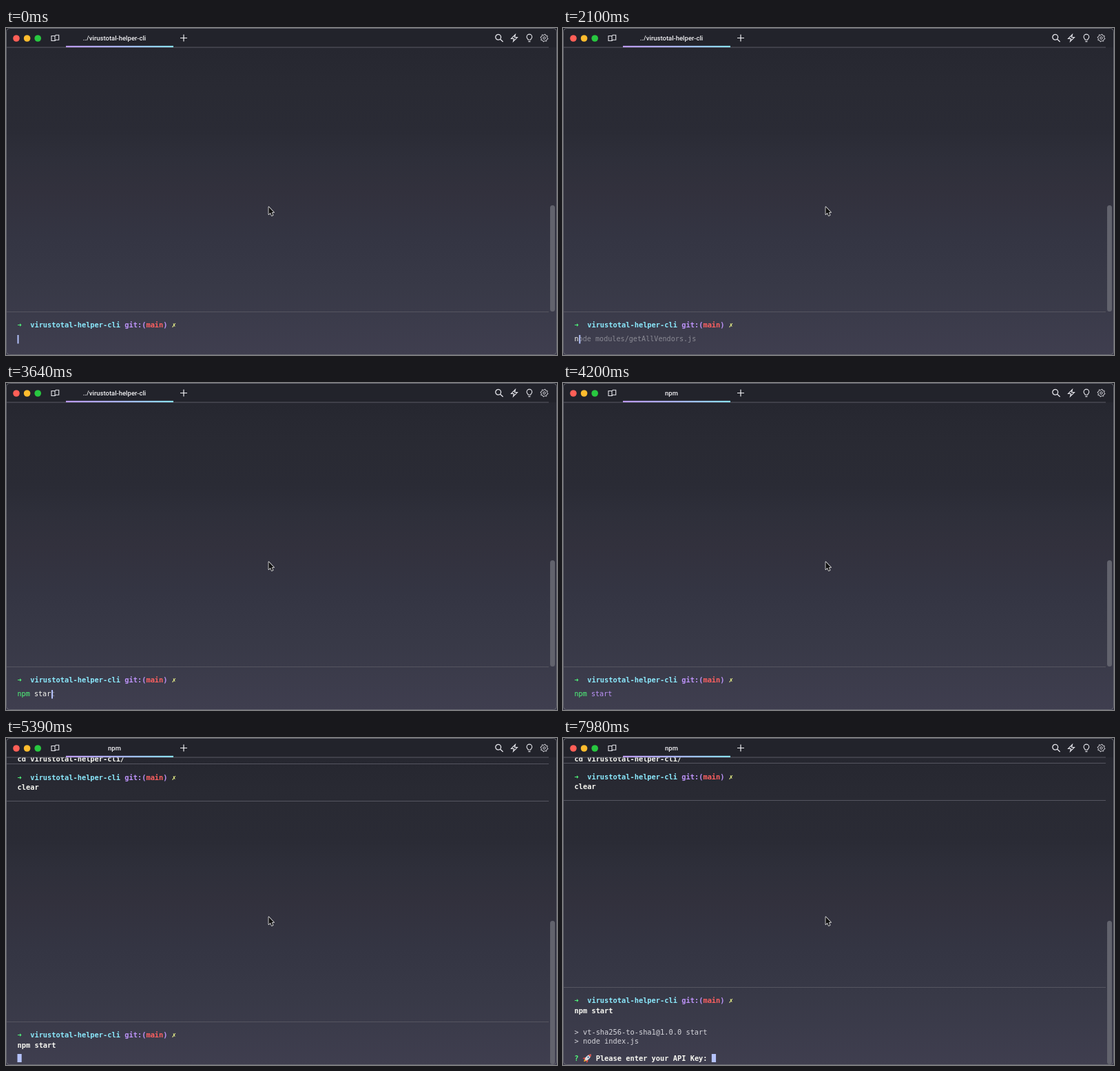
Animation of 800 by 474 pixels, one loop 8 s. Source, as an HTML page with a canvas:

```html
<!DOCTYPE html>
<html lang="en">
<head>
<meta charset="utf-8">
<title>Terminal session</title>
<style>
  html, body { margin: 0; width: 100%; height: 100%; overflow: hidden; background: #21222a; }
  canvas { display: block; width: 800px; height: 474px; }
</style>
</head>
<body>
<canvas id="stage"></canvas>
<script>
const W = 800, H = 474, LOOP = 8000;
const canvas = document.getElementById('stage');
const ctx = canvas.getContext('2d');
const ratio = window.devicePixelRatio || 1;
canvas.width = W * ratio;
canvas.height = H * ratio;

const C = {
  white: '#f8f8f2', soft: '#d6d6dc', ghost: '#8a8a94', green: '#50fa7b', cyan: '#8be9fd',
  purple: '#bd93f9', red: '#ff6060', yellow: '#f1fa8c', caret: '#b4c2fb', rule: '#555560'
};
const MONO = '"DejaVu Sans Mono", monospace';
const LEFT = 16.5, CELL = 6.23, INPUT_CELL = 6.1;
const OUTPUT = '10.35px ' + MONO, BOLD = 'bold ' + OUTPUT, INPUT = '10.13px ' + MONO;
const PROJECT = 'virustotal-helper-cli';

const COMMAND = 'npm start';
const KEYS = [2100, 2310, 2520, 2730, 3150, 3290, 3430, 3570, 3710];
const T = { npmValid: 2730, argValid: 3990, enter: 4200, block: 5180, output: 6650, question: 7980 };
const BLINK = 525;

function gradient(x0, y0, x1, y1, stops) {
  const g = ctx.createLinearGradient(x0, y0, x1, y1);
  stops.forEach(([at, color]) => g.addColorStop(at, color));
  return g;
}

function rect(x, y, w, h, color) {
  ctx.fillStyle = color;
  ctx.fillRect(x, y, w, h);
}

function disc(x, y, r, color) {
  ctx.fillStyle = color;
  ctx.beginPath();
  ctx.arc(x, y, r, 0, Math.PI * 2);
  ctx.fill();
}

function pill(x, y, w, h, color) {
  ctx.fillStyle = color;
  ctx.beginPath();
  ctx.roundRect(x, y, w, h, w / 2);
  ctx.fill();
}

function text(str, x, y, font, color, align = 'left') {
  ctx.font = font;
  ctx.textAlign = align;
  ctx.fillStyle = color;
  ctx.fillText(str, x, y);
}

function outline(path, color = '#e6e6ec', width = 1.1) {
  ctx.strokeStyle = color;
  ctx.lineWidth = width;
  ctx.stroke(new Path2D(path));
}

function rule(y) {
  rect(1, y, 787, 1, C.rule);
}

function background() {
  rect(0, 0, W, H, gradient(0, 28, 0, H, [
    [0, '#262730'], [0.13, '#292a33'], [0.27, '#2a2b35'], [0.36, '#2e2f3a'],
    [0.47, '#32313d'], [0.62, '#343543'], [0.78, '#383947'], [1, '#3f3e4f']
  ]));
}

function gear(x, y) {
  let path = '';
  for (let i = 0; i < 32; i++) {
    const a = (i + 0.5) * Math.PI / 16;
    const r = i % 4 < 2 ? 5.4 : 4.2;
    path += (i ? 'L' : 'M') + (x + r * Math.cos(a)) + ' ' + (y + r * Math.sin(a));
  }
  outline(path + 'Z', '#e6e6ec', 1);
  outline(`M${x + 1.7} ${y}a1.7 1.7 0 1 1 -3.4 0a1.7 1.7 0 1 1 3.4 0`, '#e6e6ec', 1);
}

function titleBar(title) {
  rect(0, 0, W, 28, '#22232b');
  rect(1, 27.5, 787, 1, '#5a5b64');
  ['#ff5f57', '#febc2e', '#28c840'].forEach((color, i) => disc(15 + i * 15.6, 15, 4.8, color));
  outline('M66 11.5h5v7h-5zM71 11.5l1.5-1.3h4.2v7h-4.2L71 18.5');
  text(title, 157.5, 17.8, '500 9.5px Roboto, sans-serif', '#f2f2f5', 'center');
  rect(87, 25.8, 156, 2.2, gradient(87, 0, 243, 0, [[0, '#bd9bf5'], [0.5, '#aab4f8'], [1, '#8be4fd']]));
  outline('M253 14.5h10M258 9.5v10', '#f0f0f4', 1.2);
  outline('M718.6 13.3a3.9 3.9 0 1 1 -7.8 0a3.9 3.9 0 1 1 7.8 0M717.6 16.2L721.6 20', '#e6e6ec', 1.3);
  outline('M739.5 9.5L733.5 15.5H737.5L736.5 19.5L742.5 13.5H738.5Z');
  outline('M758.2 17.3C758 15.8 756.1 15.2 756.1 12.9A3.8 3.8 0 0 1 763.7 12.9C763.7 15.2 761.8 15.8 761.6 17.3ZM758.4 19.6H761.4');
  gear(781.5, 14.5);
}

function prompt(y) {
  const parts = [
    ['➜', 0, C.green], [PROJECT, 3, C.cyan], ['git:(', 25, C.purple],
    ['main', 30, C.red], [')', 34, C.purple], ['✗', 36, C.yellow]
  ];
  parts.forEach(([str, col, color]) => text(str, LEFT + col * CELL, y, BOLD, color));
}

function blockCursor(col) {
  rect(LEFT + col * CELL, 458, 6.2, 12, C.caret);
}

function inputLine(t) {
  const put = (str, col, color) => text(str, LEFT + col * INPUT_CELL, 454, INPUT, color);
  const typed = KEYS.filter(k => t >= k).length;
  if (typed === 1) {
    put('n', 0, C.white);
    put('ode modules/getAllVendors.js', 1, C.ghost);
  } else if (typed) {
    const done = COMMAND.slice(0, typed);
    put(done.slice(0, 3), 0, t >= T.npmValid ? C.green : C.white);
    put(done.slice(4), 4, t >= T.argValid ? C.purple : C.white);
    put(COMMAND.slice(typed), typed, C.ghost);
  }
  const lastKey = typed ? KEYS[typed - 1] : -105;
  const lit = Math.floor((t - lastKey) / BLINK) % 2 === 0;
  if (t < T.enter && lit) {
    rect(LEFT + typed * INPUT_CELL + (typed ? 0.7 : 0), 445, 2, 12.5, C.caret);
  }
}

function rocket(x, y) {
  const shape = (path, color) => {
    ctx.fillStyle = color;
    ctx.fill(new Path2D(path));
  };
  ctx.save();
  ctx.translate(x, y);
  ctx.rotate(Math.PI / 4);
  shape('M-1.6 3.5Q0 11 1.6 3.5Z', '#ffab35');
  shape('M-1.5 0L-4.2 3.4V6L-1 3.6ZM1.5 0L4.2 3.4V6L1 3.6Z', '#d9483f');
  shape('M0 -7.5C3.2 -4 3 1 1.6 4H-1.6C-3 1 -3.2 -4 0 -7.5Z', '#d9dde3');
  shape('M0 -7.5C1.3 -6.2 1.9 -5.2 2.1 -4H-2.1C-1.9 -5.2 -1.3 -6.2 0 -7.5Z', '#dc4c43');
  disc(0, -1.6, 1.2, '#3c6e9c');
  ctx.restore();
}

function history(dy) {
  text('cd ' + PROJECT + '/', LEFT, 34.3 + dy * 0.5, BOLD, C.white);
  rule(37 + dy);
  prompt(60.6 + dy);
  text('clear', LEFT, 75.3 + dy, BOLD, C.white);
  rule(91 + dy);
}

function runningBlock(t) {
  const printed = t >= T.output;
  const top = printed ? 361 : 411;
  history(printed ? -1 : 0);
  rule(top);
  prompt(top + 23);
  text(COMMAND, LEFT, top + 38, BOLD, C.white);
  if (printed) {
    text('> vt-sha256-to-sha1@1.0.0 start', LEFT, 430, OUTPUT, C.soft);
    text('> node index.js', LEFT, 442.5, OUTPUT, C.soft);
  }
  if (t >= T.question) {
    text('?', LEFT, 467.6, BOLD, C.green);
    rocket(35.5, 463.8);
    text('Please enter your API Key:', LEFT + 5 * CELL, 467.6, BOLD, C.white);
    blockCursor(32);
  } else {
    blockCursor(0);
  }
}

function pointer() {
  const arrow = new Path2D('M381.4 259.3V270.2L383.9 267.8L385.7 272L387.6 271.2L385.8 267.2H389Z');
  ctx.lineJoin = 'round';
  ctx.strokeStyle = '#f4f4f4';
  ctx.lineWidth = 1.5;
  ctx.stroke(arrow);
  ctx.fillStyle = '#111';
  ctx.fill(arrow);
  ctx.lineJoin = 'miter';
}

function frame(t) {
  ctx.setTransform(ratio, 0, 0, ratio, 0, 0);
  background();
  if (t < T.block) {
    rule(411);
    prompt(434);
    inputLine(t);
    pill(790, 257, 7, 154, '#62636d');
  } else {
    runningBlock(t);
    pill(790, 265, 7, 208, '#62636d');
  }
  titleBar(t < T.enter ? '../' + PROJECT : 'npm');
  pointer();
  ctx.strokeStyle = '#666770';
  ctx.lineWidth = 1;
  ctx.beginPath();
  ctx.roundRect(0.5, 0.5, W - 1, H - 1, 5);
  ctx.stroke();
}

const start = performance.now();
function tick() {
  frame((performance.now() - start) % LOOP);
  requestAnimationFrame(tick);
}
tick();
</script>
</body>
</html>
```
